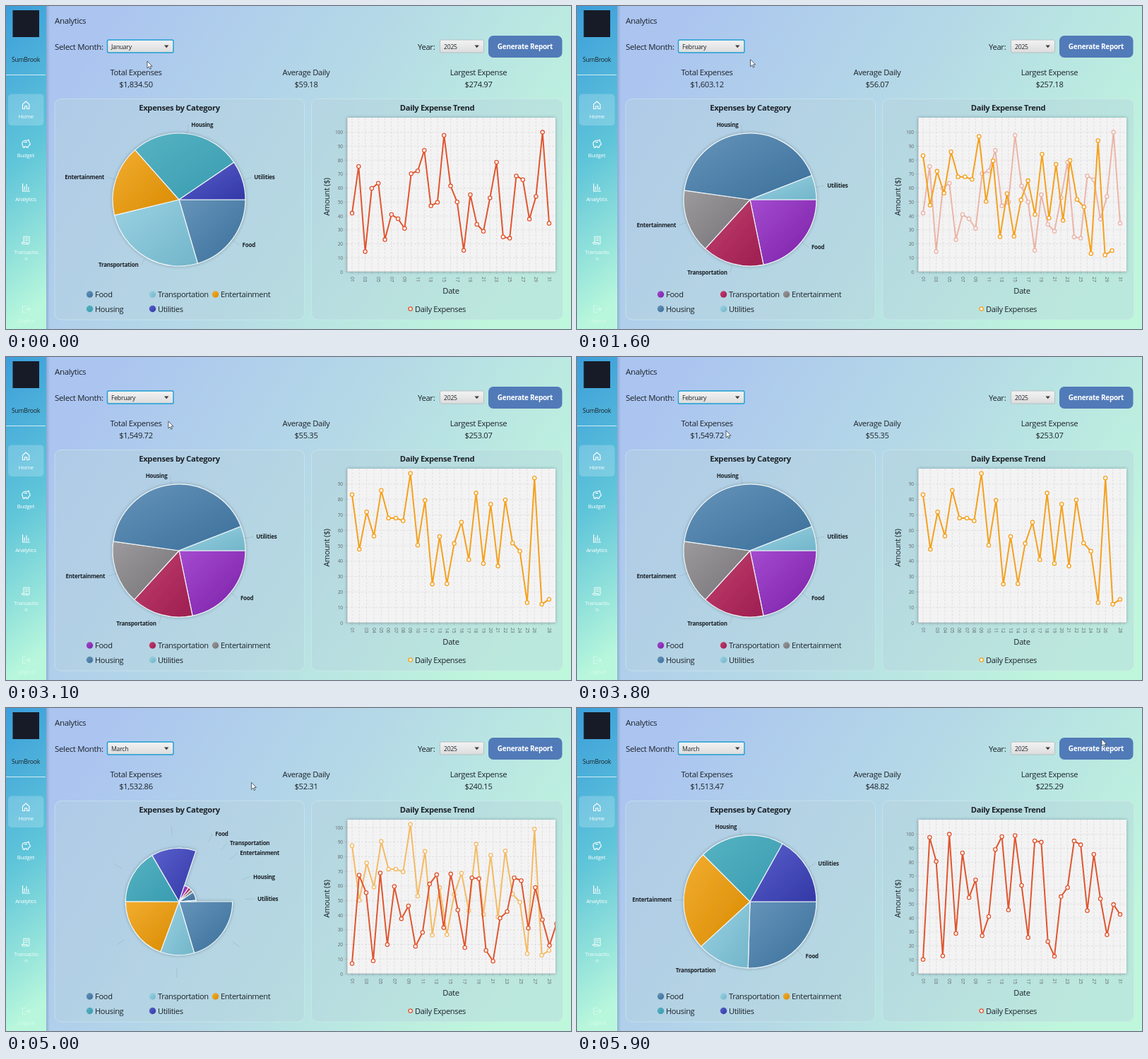
Recreate the animation shown at these times as an HTML page. Size 800 by 457 pixels, loop 6000 ms.

```html
<!DOCTYPE html>
<html lang="en">
<head>
<meta charset="utf-8">
<title>Analytics</title>
<style>
html, body { margin: 0; width: 100%; height: 100%; overflow: hidden; }
svg { display: block; width: 100vw; height: 100vh; }
text { font-family: "Open Sans", "Noto Sans", sans-serif; letter-spacing: -.03em; fill: #1d2329; }
.b { font-weight: 700; }
.m { text-anchor: middle; }
.e { text-anchor: end; }
.tick { font-size: 6.8px; fill: #62686c; }
.side text { font-size: 7.7px; fill: #fff; text-anchor: middle; }
.icon { fill: none; stroke: #fff; stroke-width: 1.1; stroke-linejoin: round; stroke-linecap: round; }
.panel { fill: #b6d2dc; fill-opacity: .42; stroke: #d6ebee; stroke-opacity: .55; }
</style>
</head>
<body>
<svg id="stage" viewBox="0 0 800 457" preserveAspectRatio="none"></svg>
<script>
const LOOP = 6000, STEP = 100;
const CX = 245, CY = 274, R = 94, LABEL_R = 107;
const X0 = 490, BASE = 376, TOP = 158, LEFT = 483, RIGHT = 778;
const NAMES = ['Food', 'Transportation', 'Entertainment', 'Housing', 'Utilities'];

// light and dark end of each slice colour
const COLORS = [
  ['#6694ba', '#3a6f9a'], ['#9ad2e2', '#72b5ca'], ['#f2ad30', '#d98a00'], ['#57b3c2', '#389bb0'],
  ['#5a60cc', '#3238a6'], ['#a44bd0', '#7a1fa6'], ['#c23e6e', '#9d1f50'], ['#9c9a9c', '#747274']
];

const MONTHS = [
  { name: 'January', start: -1e6, pick: 0, total: 1834.5, avg: 59.18, max: 274.97, line: '#e0562f',
    hues: [0, 1, 2, 3, 4], arcs: [73.7, 92.7, 62.1, 97.3, 34.2], gap: 9.3, unit: 1.974,
    days: [42, 75.5, 14.5, 59.8, 63.5, 23, 41, 38, 31, 70.3, 72.3, 87, 47.2, 49.8, 97.8, 61.5,
      50, 15.3, 55.2, 34, 29, 53, 78.5, 25, 24, 68.7, 66, 37.7, 54, 100, 34.7] },
  { name: 'February', start: 950, pick: 900, total: 1549.72, avg: 55.35, max: 253.07, line: '#f4a11d',
    hues: [5, 6, 7, 0, 1], arcs: [78.3, 54.1, 55.6, 150.6, 21.4], gap: 10.33, unit: 2.178,
    days: [83.2, 47.7, 72, 56.3, 86, 68, 68, 66.2, 97, 50.4, 79.5, 25.1, 56, 25.4, 51.5, 65.3,
      41, 84.2, 38.5, 77, 36.8, 79.8, 51.8, 46.5, 13.1, 94, 12, 15.2] },
  { name: 'March', start: 4628, pick: 4600, total: 1513.47, avg: 48.82, max: 225.29, line: '#e0562f',
    hues: [0, 1, 2, 3, 4], arcs: [91.7, 45.9, 87.4, 74.3, 60.7], gap: 9.3, unit: 1.974,
    days: [10.2, 97.8, 80.5, 12.8, 100, 28.9, 86.6, 54.6, 67.3, 27.2, 41, 89, 98.3, 45.7, 99, 63.3,
      26, 95.3, 94.3, 23.1, 12.5, 55.3, 61.8, 95.2, 92.4, 45.2, 85.6, 53.7, 28, 49.6, 42.5] }
];

// time, x, y of the pointer tip
const POINTER = [[0, 200, 78], [500, 207, 80], [1100, 241, 76], [2300, 253, 75],
  [3800, 211, 104], [4600, 206, 115], [4800, 230, 113], [5400, 683, 83], [5900, 743, 44]];

const clamp = v => Math.max(0, Math.min(1, v));
const mix = (a, b, p) => a + (b - a) * p;
const smooth = p => p * p * (3 - 2 * p);
const easeBoth = p => p < .2 ? 3.125 * p * p : p > .8 ? 1 - 3.125 * (1 - p) ** 2 : 1.25 * p - .125;
const money = v => '$' + v.toFixed(2).replace(/\B(?=(\d{3})+\.)/, ',');
const text = (x, y, size, s, cls = '', more = '') =>
  `<text x="${x}" y="${y}" font-size="${size}" class="${cls}" ${more}>${s}</text>`;
const rect = (x, y, w, h, more) => `<rect x="${x}" y="${y}" width="${w}" height="${h}" ${more}/>`;
const seg = (x1, y1, x2, y2, more = '') => `<path d="M${x1} ${y1}L${x2} ${y2}" ${more}/>`;
const polar = (deg, r) => {
  const a = deg * Math.PI / 180;
  return [CX + r * Math.cos(a), CY + r * Math.sin(a)];
};

function gradient(id, stops, dir) {
  return `<linearGradient id="${id}" ${dir}>` + stops.map((c, i) =>
    `<stop offset="${i / (stops.length - 1)}" stop-color="${c}"/>`).join('') + '</linearGradient>';
}

function combo(x, w, border) {
  const a = x + w - 13;
  return rect(x, 48, w, 18, `rx="2" fill="url(#combo)" ${border}`) +
    `<path d="M${a} 55.5h6.4l-3.2 3.8z" fill="#3a3a3a"/>`;
}

function sidebar() {
  const icon = (d, more = '') => `<path class="icon" d="${d}" ${more}/>`;
  return rect(57, 0, 5, 457, 'fill="url(#edge)"') + rect(0, 0, 57, 457, 'fill="url(#side)"') +
    rect(9.5, 6, 37.5, 38, 'fill="#171b27"') + text(28, 79, 8.7, 'SumBrook', 'm') +
    seg(0, 97.5, 56, 97.5, 'stroke="#fff" stroke-opacity=".75"') +
    rect(3, 124.5, 50.5, 44.5, 'rx="5" fill="#fff" fill-opacity=".2"') +
    '<g class="side">' +
    icon('M23.5 139.2l4.7-4.2 4.7 4.2v6.3h-3.2v-3.8h-3v3.8h-3.2z') + text(28.3, 158.5, 0, 'Home') +
    icon('M23 193.5c1-3 4-3.6 7-3.2l2.4-1.1v2.6l1.6 2.2v2.6l-1.8.7-1 2.8h-2.2v-1.4h-2.5v1.4h-2.2l-.6-2.8c-.8-1-1-2.4-.7-3.8zM26.5 192.6h3') +
    text(28, 213.5, 0, 'Budget') +
    icon('M23.6 251.5v10.5h9.8') + icon('M26.2 255.5v4.5M29 252.5v7.5M31.8 256.5v3.5', 'stroke-width="1.7"') +
    text(28, 276, 0, 'Analytics') +
    icon('M25 334.5v-8.3h8v8.5c0 1.3-.8 2-1.8 2h-7c-1 0-1.6-.7-1.6-2.2h7.2c0 1.5.5 2.2 1.4 2.2M27 328.8h4M27 331.3h4', 'opacity=".85"') +
    `<g opacity=".85">${text(28.5, 350.5, 0, 'Transactio')}${text(28.5, 359.5, 0, 'n')}</g>` +
    '<g opacity=".4">' + icon('M28 424.5h-4.5v9h4.5M27 429h7m-2.5-2.5l2.5 2.5-2.5 2.5') +
    text(29, 448, 0, 'Logout') + '</g></g>';
}

function fixedParts() {
  const heading = (x, s) => text(x, 97.5, 11.3, s, 'm');
  return '<defs>' +
    gradient('bg', ['#abc4f0', '#b5dae6', '#bff7dc'], 'gradientUnits="userSpaceOnUse" x1="130" y1="20" x2="730" y2="400"') +
    gradient('side', ['#3c9edb', '#5fc5d9', '#b8f7dc'], 'x1="0" y1="0" x2=".1" y2="1"') +
    gradient('combo', ['#f3f3f3', '#dcdcdc'], 'x1="0" y1="0" x2="0" y2="1"') +
    '<linearGradient id="edge"><stop stop-color="#38648c" stop-opacity=".28"/><stop offset="1" stop-color="#38648c" stop-opacity="0"/></linearGradient>' +
    COLORS.map((c, i) => gradient('c' + i, c, 'x1="0" y1="0" x2="1" y2="1"')).join('') +
    '<filter id="soft" x="-10%" y="-10%" width="120%" height="120%"><feDropShadow dx="0" dy="0" stdDeviation="2" flood-color="#234" flood-opacity=".35"/></filter>' +
    `<clipPath id="plot">${rect(LEFT, TOP, RIGHT - LEFT, BASE - TOP, '')}</clipPath></defs>` +
    rect(0, 0, 800, 457, 'fill="url(#bg)"') + sidebar() +
    text(69, 25, 11.5, 'Analytics') + text(69, 61.5, 11.5, 'Select Month:') +
    combo(143.5, 93.5, 'stroke="#1c9fd4" stroke-width="1.4"') +
    text(583, 61.5, 11.3, 'Year:') + combo(614.5, 62, 'stroke="#b3bcc0" stroke-width=".9"') + text(620, 60.5, 8.7, '2025') +
    rect(683, 42, 104.5, 31, 'rx="7" fill="#517ab8"') + text(735, 61, 10, 'Generate Report', 'b m', 'style="fill:#fff"') +
    heading(184, 'Total Expenses') + heading(425, 'Average Daily') + heading(669, 'Largest Expense') +
    rect(69, 131.5, 353.5, 312.5, 'rx="9" class="panel"') + rect(432.5, 131.5, 356, 312.5, 'rx="9" class="panel"') +
    text(245.5, 148, 11.25, 'Expenses by Category', 'b m') + text(610.5, 148, 11.2, 'Daily Expense Trend', 'b m') +
    rect(LEFT, TOP, RIGHT - LEFT, BASE - TOP, 'fill="#f4f3f4" filter="url(#soft)"') +
    text(630, 406.5, 11.2, 'Date', 'm') + text(0, 0, 11, 'Amount ($)', 'm', 'transform="translate(458 270) rotate(-90)"') +
    text(579, 432.5, 11.05, 'Daily Expenses') +
    NAMES.map((n, i) => text(126 + i % 3 * 89, 412 + (i > 2) * 20.5, 11.1, n)).join('');
}

function pie(cur, old, dt) {
  const p = clamp(dt / 500), q = easeBoth(p), parts = [];
  const add = (m, amount, radius, alpha) => m.arcs.forEach((a, i) =>
    parts.push({ v: a * m.total * amount, hue: m.hues[i], name: NAMES[i], radius: R * radius, alpha }));
  add(cur, q, q, clamp((dt - 500) / 150));
  if (old && p < 1) add(old, 1 - q, 1 - p, 1);
  const sum = parts.reduce((s, o) => s + o.v, 0) || 1;
  let angle = 0, slices = '', labels = '';
  for (const o of parts) {
    const span = o.v / sum * 360, mid = angle + span / 2;
    const [x1, y1] = polar(angle, o.radius), [x2, y2] = polar(angle + span, o.radius);
    slices += `<path d="M${CX} ${CY}L${x1} ${y1}A${o.radius} ${o.radius} 0 ${+(span > 180)} 1 ${x2} ${y2}Z" fill="url(#c${o.hue})"/>`;
    const [ex, ey] = polar(mid, LABEL_R), left = ex < CX;
    labels += seg(...polar(mid, R), ex, ey, 'stroke="#7d8f98" stroke-opacity=".3" stroke-width=".9"') +
      text(ex + (left ? -4 : 4), ey + 2.8, 8, o.name, left ? 'b e' : 'b', `opacity="${o.alpha}"`);
    angle += span;
  }
  return `<g filter="url(#soft)" stroke="#eef4f6" stroke-width="1.2" stroke-linejoin="round">${slices}</g>` + labels;
}

function series(m, gap, unit, alpha) {
  const pts = m.days.map((v, i) => [X0 + i * gap, BASE - v * unit]);
  return `<g opacity="${alpha}" stroke="${m.line}"><path d="M${pts.map(p => p.join(' ')).join('L')}" fill="none" stroke-width="2" stroke-linejoin="round"/>` +
    pts.map(([x, y]) => `<circle cx="${x}" cy="${y}" r="2.6" fill="#fff" stroke-width="1.3"/>`).join('') + '</g>';
}

function trend(cur, old, dt) {
  const from = old || cur, shrink = cur.days.length < from.days.length;
  const gap = mix(from.gap, cur.gap, clamp(dt / 1100));
  const axisGap = shrink ? mix(from.gap, cur.gap, clamp((dt - 900) / 200)) : gap;
  const unit = mix(from.unit, cur.unit, clamp(shrink ? (dt - 700) / 600 : dt / 700));
  let grid = '', marks = '', out = '';
  for (let v = 0; v <= 100; v += 10) {
    const y = BASE - v * unit;
    if (y < 165) continue;
    if (v) grid += seg(LEFT, y, RIGHT, y);
    marks += seg(480, y, LEFT, y);
    out += text(477, y + 2.5, 6.8, v, 'tick e');
  }
  const wide = axisGap > 10, count = wide ? 28 : 31;
  for (let d = 1; d <= count; d++) {
    const x = X0 + (d - 1) * axisGap;
    if (x > RIGHT - 3) break;
    grid += seg(x, TOP, x, BASE);
    marks += seg(x, BASE, x, BASE + 3);
    if (wide ? d !== 2 && d !== 27 : d % 2)
      out += text(0, 0, 6.8, String(d).padStart(2, '0'), 'tick', `transform="translate(${x - 2.3} 383) rotate(90)"`);
  }
  const fade = Math.pow(clamp(1 - dt / 900), .75);
  return `<g stroke="#d9d9da" stroke-width=".7" stroke-dasharray="3 2">${grid}</g>` +
    `<g stroke="#a3abae" stroke-width=".7">${marks}${seg(LEFT, TOP, LEFT, BASE)}${seg(LEFT, BASE, RIGHT, BASE)}</g>` + out +
    '<g clip-path="url(#plot)">' + (old && fade ? series(old, old.gap, old.unit, fade) : '') +
    series(cur, gap, unit * clamp(dt / 540), 1) + '</g>' +
    `<circle cx="572.7" cy="428.5" r="2.6" fill="#fff" stroke="${cur.line}" stroke-width="1.4"/>`;
}

function pointer(t) {
  let i = POINTER.length - 2;
  while (i && POINTER[i][0] > t) i--;
  const [a, b] = [POINTER[i], POINTER[i + 1]], p = smooth(clamp((t - a[0]) / (b[0] - a[0])));
  return `<path transform="translate(${mix(a[1], b[1], p)} ${mix(a[2], b[2], p)})" d="M0 0V10L2.4 7.8 3.9 11.3 5.5 10.6 4 7.2H7Z" fill="#fff" stroke="#333b44" stroke-width=".8"/>`;
}

function draw(t) {
  const n = MONTHS.filter(m => t >= m.start).length - 1;
  const cur = MONTHS[n], old = MONTHS[n - 1], dt = t - cur.start;
  const count = key => money(mix((old || cur)[key], cur[key], clamp(dt / 800)));
  const picked = MONTHS.filter(m => t >= m.pick).pop();
  live.innerHTML = text(149, 60.5, 8.7, picked.name) +
    text(184, 114.5, 11.2, count('total'), 'm') + text(425, 114.5, 11.2, count('avg'), 'm') +
    text(669, 114.5, 11.2, count('max'), 'm') + pie(cur, old, dt) +
    cur.hues.map((h, i) => `<circle cx="${118.5 + i % 3 * 89}" cy="${408 + (i > 2) * 20.5}" r="4.7" fill="url(#c${h})"/>`).join('') +
    trend(cur, old, dt) + pointer(t);
}

const stage = document.getElementById('stage');
stage.innerHTML = fixedParts() + '<g id="live"></g>';
const live = document.getElementById('live');
// side labels take their size from the style sheet
const begin = performance.now();
let last = -1;
function tick() {
  const t = Math.floor((performance.now() - begin) % LOOP / STEP) * STEP;
  if (t !== last) draw(last = t);
  requestAnimationFrame(tick);
}
tick();
</script>
</body>
</html>
```
